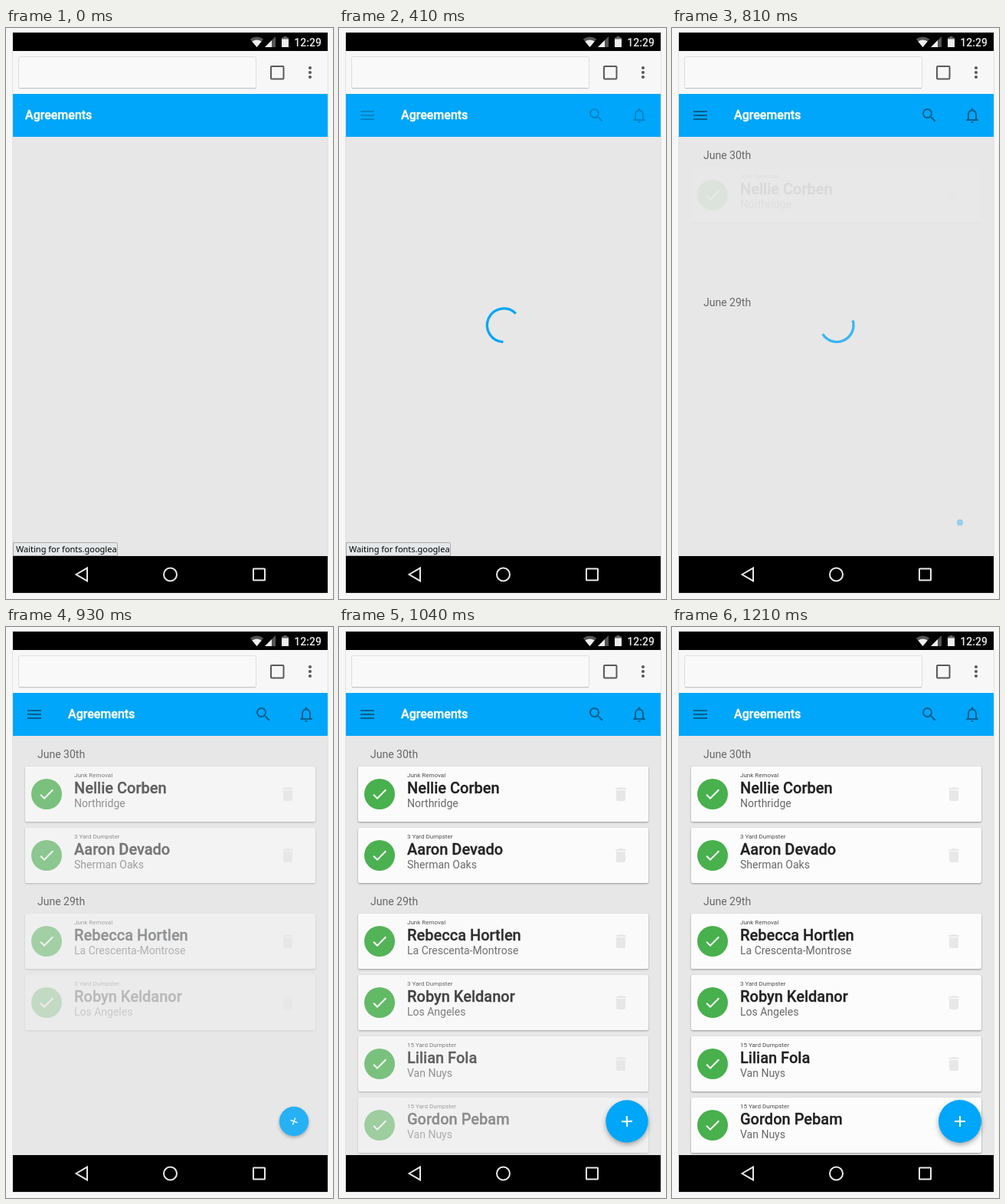
An HTML page for the animation above (2.76 s loop, 427 px wide and 745 px high).

```html
<!DOCTYPE html>
<html lang="en">
<head>
<meta charset="utf-8">
<title>Agreements</title>
<style>
  html, body { margin: 0; width: 100%; height: 100%; overflow: hidden; background: #f7f7f7; }
  svg { display: block; width: 100%; height: 100%; font-family: Roboto, sans-serif; }
  .title { font-size: 16px; font-weight: 500; fill: #fff; stroke: #fff; stroke-width: .4; }
  .clock { font-size: 14px; font-weight: 500; fill: #e6e6e6; }
  .bubble { font: 11px "Noto Sans", sans-serif; fill: #000; }
  .date, .town { font-size: 14px; fill: #686868; }
  .job { font-size: 8px; fill: #4a4a4a; }
  .name { font-size: 20px; font-weight: 500; fill: #212121; stroke: #212121; stroke-width: .3; }
  .sheet { fill: #fcfcfc; filter: drop-shadow(0 1px 1.2px rgba(0,0,0,.36)); }
  .disc { fill: #00a6f9; filter: drop-shadow(0 3px 3px rgba(0,0,0,.32)); }
  .line { fill: none; stroke: #e8e8e8; stroke-width: 2; }
</style>
</head>
<body>
<svg viewBox="0 0 427 745">
  <rect width="427" height="745" fill="#f7f7f7"/>
  <rect x="8.5" y="5.5" width="412" height="732" fill="#e7e7e7" stroke="#e2e2e2"/>

  <g id="dates" class="date">
    <text x="41" y="171">June 30th</text>
    <text x="41" y="363">June 29th</text>
  </g>
  <g id="cards"></g>
  <path id="spinner" fill="none" stroke="#03a7f7" stroke-width="3.3"/>
  <g id="fab">
    <circle class="disc" r="28"/>
    <path id="plus" d="M-7 0H7M0-7V7" stroke="#fff" stroke-width="2"/>
  </g>
  <g id="bubble">
    <path d="M9.5 689V671.5H143.5Q145.5 671.5 145.5 673.5V688.5H9.5" fill="#e5e8ea" stroke="#a9a9a9"/>
    <text class="bubble" x="13" y="684">Waiting for fonts.googlea</text>
  </g>

  <rect x="9" y="86" width="411" height="56" fill="#00a6f9"/>
  <text id="title" class="title" y="119">Agreements</text>
  <g id="icons"></g>

  <rect x="9" y="30" width="411" height="56" fill="#f7f7f7"/>
  <rect x="16.5" y="37.5" width="310" height="41" rx="2" fill="#f9f9f9" stroke="#dedede"/>
  <path d="M17 78.7H326" stroke="#c6c6c6" stroke-width="1.2"/>
  <rect x="346" y="50" width="16.5" height="16.5" rx="1" fill="none" stroke="#5a5a5a" stroke-width="2"/>
  <g fill="#5a5a5a">
    <circle cx="397" cy="52" r="2.1"/><circle cx="397" cy="58" r="2.1"/><circle cx="397" cy="64" r="2.1"/>
  </g>

  <rect x="9" y="6" width="411" height="24" fill="#000"/>
  <path d="M327.5 25L318.8 14.6Q327.5 8.6 336.2 14.6Z" fill="#555"/>
  <path d="M327.5 25L321.3 17.6Q327.5 13.6 333.7 17.6Z" fill="#eee"/>
  <path d="M338 25H352V11Z" fill="#555"/>
  <path d="M338 25H347V16Z" fill="#eee"/>
  <path d="M360 15V12.5H362.5V11H366.5V12.5H369V15Z" fill="#666"/>
  <rect x="360" y="14.5" width="9" height="10.5" fill="#eee"/>
  <text class="clock" x="376.3" y="24">12:29</text>

  <rect x="9" y="689" width="411" height="48" fill="#000"/>
  <path class="line" d="M91.5 713L106 704.6V721.4Z"/>
  <circle class="line" cx="214.5" cy="713" r="8.5"/>
  <rect class="line" x="323" y="705.5" width="15" height="15" rx=".6"/>
</svg>
<script>
const LOOP = 2760, STEP = 57.73, LAST = 21;
const $ = id => document.getElementById(id);

const glyph = {
  menu: "M3 18h18v-2H3v2zm0-5h18v-2H3v2zm0-7v2h18V6H3z",
  search: "M15.5 14h-.79l-.28-.27C15.41 12.59 16 11.11 16 9.5 16 5.91 13.09 3 9.5 3S3 5.91 3 9.5 5.91 16 9.5 16c1.61 0 3.09-.59 4.23-1.57l.27.28v.79l5 4.99L20.49 19l-4.99-5zm-6 0C7.01 14 5 11.99 5 9.5S7.01 5 9.5 5 14 7.01 14 9.5 11.99 14 9.5 14z",
  bell: "M12 22c1.1 0 2-.9 2-2h-4c0 1.1.9 2 2 2zm6-6v-5c0-3.07-1.63-5.64-4.5-6.32V4c0-.83-.67-1.5-1.5-1.5s-1.5.67-1.5 1.5v.68C7.64 5.36 6 7.92 6 11v5l-2 2v1h16v-1l-2-2zm-2 1H8v-6c0-2.48 1.51-4.5 4-4.5s4 2.02 4 4.5v6z",
  bin: "M6 19c0 1.1.9 2 2 2h8c1.1 0 2-.9 2-2V7H6v12zM19 4h-3.5l-1-1h-5l-1 1H5v2h14V4z",
  tick: "M9 16.17L4.83 12l-1.42 1.41L9 19 21 7l-1.41-1.41z"
};

const rows = [
  ["Junk Removal", "Nellie Corben", "Northridge"],
  ["3 Yard Dumpster", "Aaron Devado", "Sherman Oaks"],
  ["Junk Removal", "Rebecca Hortlen", "La Crescenta-Montrose"],
  ["3 Yard Dumpster", "Robyn Keldanor", "Los Angeles"],
  ["15 Yard Dumpster", "Lilian Fola", "Van Nuys"],
  ["15 Yard Dumpster", "Gordon Pebam", "Van Nuys"]
];
const iconX = { menu: 37, search: 336, bell: 392 };

// Two cards stand under the first date, the rest under the second.
const rowTop = i => 182 + 80 * i + (i > 1 ? 32 : 0);
const rowStart = i => 800 + 20 * i + 2.6 * i * i;

const linear = p => p;
const sineOut = p => Math.sin(p * Math.PI / 2);

// cubic-bezier(.4, 0, .2, 1)
function swift(p) {
  let lo = 0, hi = 1;
  for (let i = 0; i < 20; i++) {
    const s = (lo + hi) / 2, r = 1 - s;
    if (1.2 * r * r * s + .6 * r * s * s + s ** 3 < p) lo = s; else hi = s;
  }
  return lo * lo * (3 - 2 * lo);
}

const ramp = (t, start, length, ease = linear) =>
  ease(Math.min(1, Math.max(0, (t - start) / length)));

$("cards").innerHTML = rows.map(([job, name, town], i) => `
  <g transform="translate(25 ${rowTop(i)})">
    <rect class="sheet" width="379" height="72" rx="2"/>
    <circle cx="28" cy="36" r="20" fill="#48b04d"/>
    <path d="${glyph.tick}" transform="translate(16 24)" fill="#fff"/>
    <text class="job" x="64" y="14">${job}</text>
    <text class="name" x="64" y="35">${name}</text>
    <text class="town" x="64" y="53">${town}</text>
    <path d="${glyph.bin}" transform="translate(331 24)" fill="#e8e8e8"/>
  </g>`).join("");
$("icons").innerHTML = Object.keys(iconX).map(name => `<path d="${glyph[name]}"/>`).join("");
const cards = [...$("cards").children];
const icons = [...$("icons").children];

const set = (el, key, value) => el.setAttribute(key, value);
const fade = (el, value) => set(el, "opacity", value);
const rad = deg => deg * Math.PI / 180;

// The arc turns steadily while its length swings between 10 and 270 degrees.
function arc(t) {
  const middle = .54 * t - 12;
  const length = 140 - 130 * Math.cos(rad(.315 * t + 4));
  const point = deg =>
    `${215.2 + 21.8 * Math.cos(rad(deg))} ${387.8 + 21.8 * Math.sin(rad(deg))}`;
  return `M${point(middle - length / 2)}A21.8 21.8 0 ${length > 180 ? 1 : 0} 1 ${point(middle + length / 2)}`;
}

// The picture holds still between ticks of the clock.
const tickTime = k => Math.round(k * STEP / 10) * 10;
function snap(t) {
  let k = LAST;
  while (k > 0 && tickTime(k) > t) k--;
  return tickTime(k);
}

function draw(t) {
  set($("title"), "x", 25 + 56 * ramp(t, 50, 300, swift));

  const size = ramp(t, 150, 300, swift);
  Object.values(iconX).forEach((x, i) =>
    set(icons[i], "transform", `translate(${x} 114) scale(${size}) translate(-12 -12)`));
  fade($("icons"), .42 * ramp(t, 190, 450));

  fade($("bubble"), 1 - ramp(t, 400, 200));
  fade($("dates"), ramp(t, 590, 160));
  fade($("spinner"), ramp(t, 50, 120) - ramp(t, 760, 200, swift));
  set($("spinner"), "d", arc(t));
  cards.forEach((el, i) => fade(el, ramp(t, rowStart(i), 250, sineOut)));

  const grown = ramp(t, 785, 280, sineOut);
  set($("fab"), "transform", `translate(376 645) scale(${grown})`);
  fade($("fab"), Math.sqrt(grown));
  set($("plus"), "transform", `rotate(${225 * (grown - 1)})`);
}

const start = performance.now();
function frame() {
  draw(snap((performance.now() - start) % LOOP));
  requestAnimationFrame(frame);
}
frame();
</script>
</body>
</html>
```
